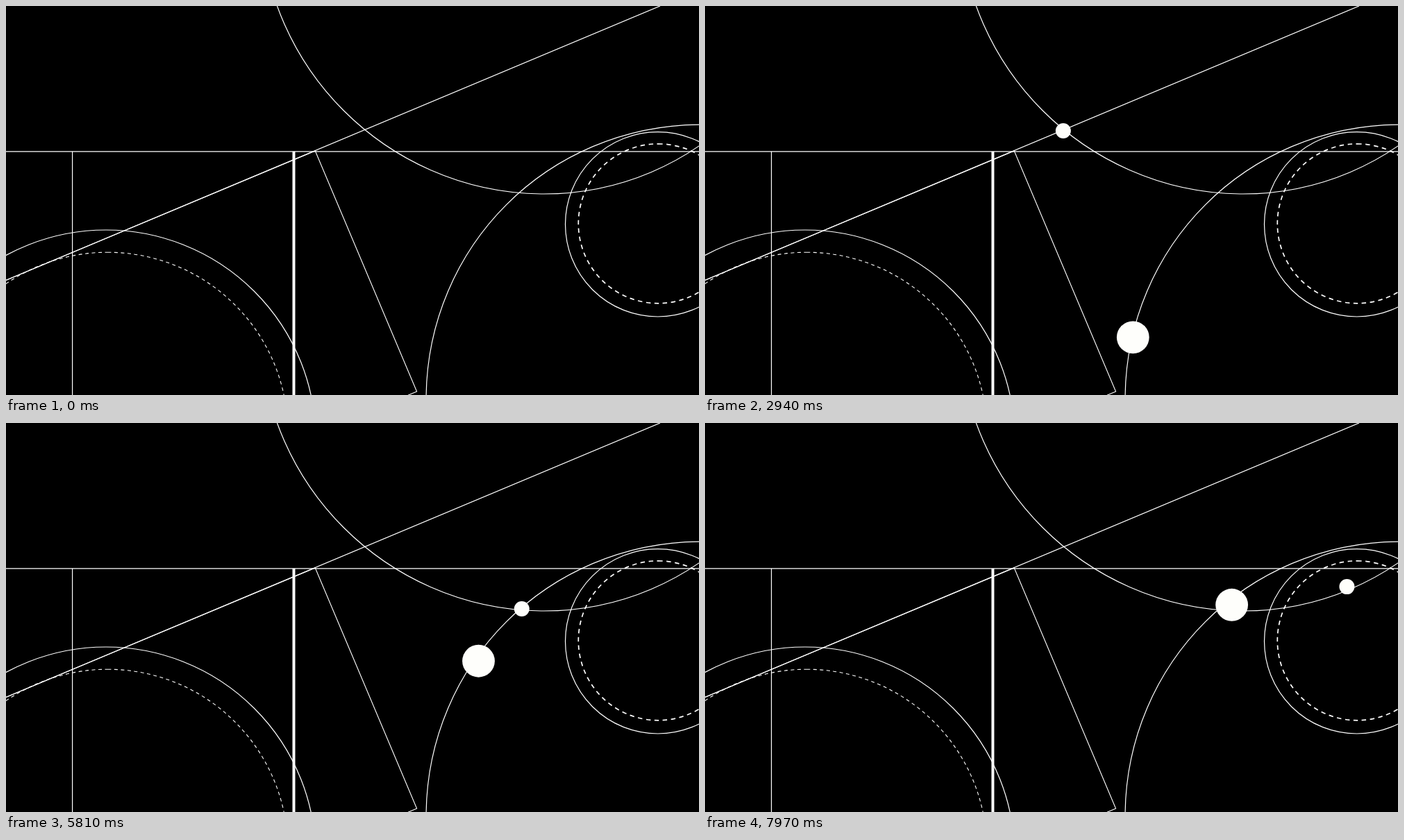
An HTML page with a canvas for the animation above (8 s loop, 998x561 px).

```html
<!DOCTYPE html>
<html lang="en">
<head>
<meta charset="utf-8">
<title>Orbits</title>
<style>
  html, body { margin: 0; width: 100%; height: 100%; overflow: hidden; background: #000; }
  canvas { display: block; }
</style>
</head>
<body>
<canvas id="stage" width="998" height="561"></canvas>
<script>
const LOOP = 8000;
const DEG = Math.PI / 180;
const ctx = document.getElementById('stage').getContext('2d');

// Dots circle at a steady rate; a negative period runs counterclockwise
const dots = [
  { x: 766.5, y: -129, orbit: 397.8, from: 165.56, period: -29000, size: 11 },
  { x: 1010, y: 583, orbit: 407.5, from: 173.35, period: 49000, size: 23.4 }
];

function line(width, ...points) {
  ctx.lineWidth = width;
  ctx.beginPath();
  points.forEach(([x, y]) => ctx.lineTo(x, y));
  ctx.stroke();
}

function ring(x, y, r, width = 1.2, dash = []) {
  ctx.lineWidth = width;
  ctx.setLineDash(dash);
  ctx.beginPath();
  ctx.arc(x, y, r, -Math.PI / 2, Math.PI * 1.5);
  ctx.stroke();
  ctx.setLineDash([]);
}

// Ellipse whose long axis lies on the falling diagonal
function oval(x, y, long, short) {
  ctx.lineWidth = 1.2;
  ctx.beginPath();
  ctx.ellipse(x, y, long, short, 45 * DEG, 0, Math.PI * 2);
  ctx.stroke();
}

function drawDot({ x, y, orbit, from, period, size }, time) {
  const angle = (from + 360 * time / period) * DEG;
  ctx.beginPath();
  ctx.arc(x + orbit * Math.cos(angle), y + orbit * Math.sin(angle), size, 0, Math.PI * 2);
  ctx.fill();
}

function draw(time) {
  ctx.fillStyle = '#000';
  ctx.fillRect(0, 0, 998, 561);
  ctx.strokeStyle = '#fff';

  line(1.3, [0, 209.9], [998, 209.9]);
  line(1.2, [95.6, 210], [95.6, 561]);
  line(4, [414.5, 210], [414.5, 561]);
  line(1.3, [0, 395.4], [942, 0]);
  line(1.1, [0, 395.6], [445.3, 209], [591.6, 556], [579, 561.3]);

  oval(766.5, -129, 404, 396);
  oval(1010, 576, 409.3, 400.5);

  ring(144, 625, 302);
  ring(146.5, 614.5, 259.3, 1.1, [5, 4.5]);
  ring(938.7, 314.8, 133.2);
  ring(939.3, 313.8, 115, 1.7, [6.5, 5.5]);

  ctx.fillStyle = '#fefefb';
  dots.forEach(dot => drawDot(dot, time));
}

const start = performance.now();
function tick() {
  draw((performance.now() - start) % LOOP);
  requestAnimationFrame(tick);
}
tick();
</script>
</body>
</html>
```
